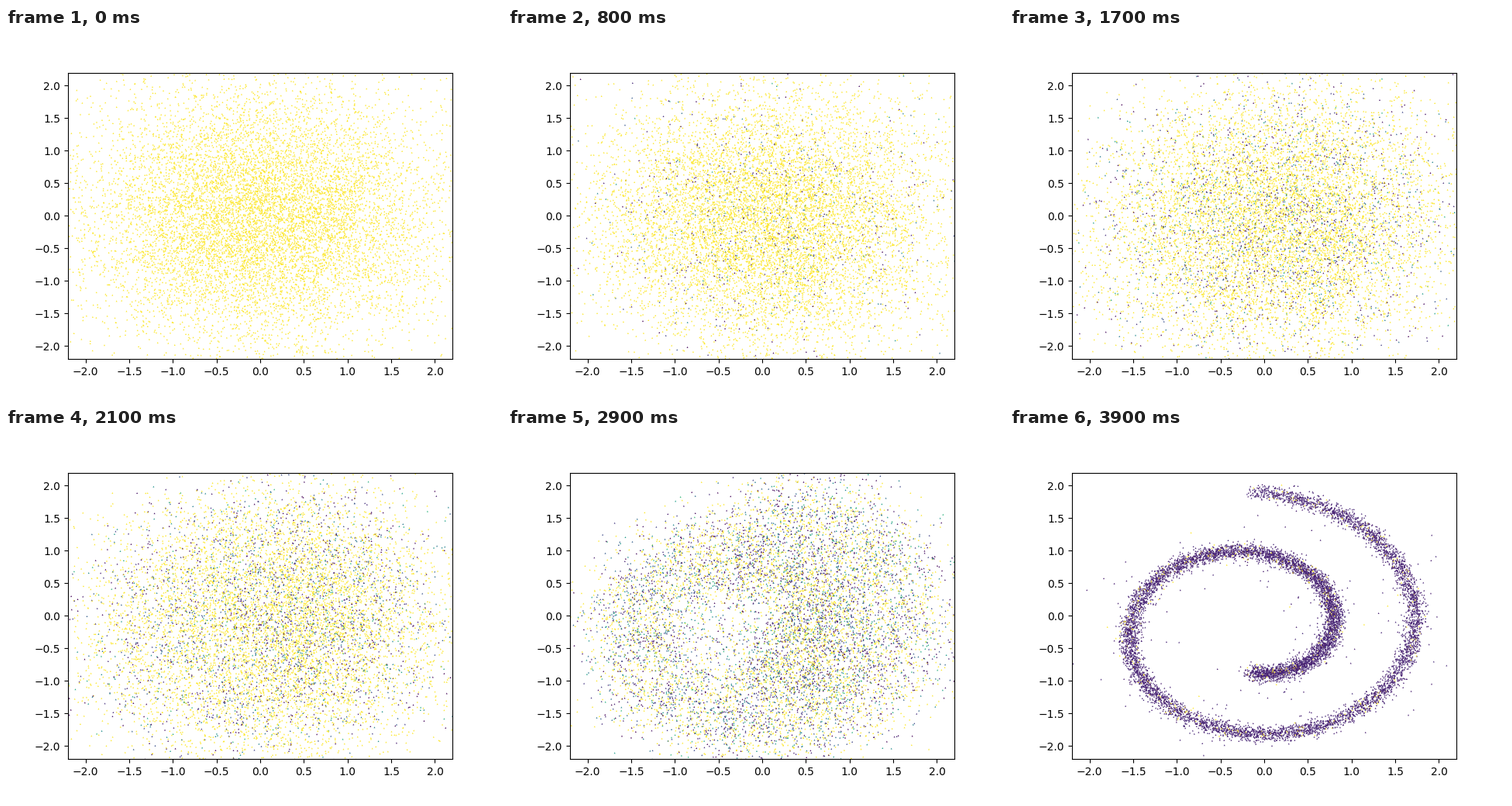
A matplotlib script that plays this animation: 640x480 px, repeating every 4000 ms.

```python
import numpy as np
import matplotlib.pyplot as plt
from matplotlib.animation import FuncAnimation

FRAMES = 40
COUNT = 10000
rng = np.random.default_rng(7)


def swiss_roll(n):
    t = 1.5 * np.pi * (1 + 2 * rng.random(n))
    roll = 0.148 * np.column_stack([t * np.cos(t), t * np.sin(t)])
    # a small share of the points strays from the roll
    spread = np.where(rng.random((n, 1)) < 0.03, 0.24, 0.06)
    return roll + [-0.14, -0.18] + spread * rng.normal(size=(n, 2))


def diffuse(start):
    """Add noise step by step; the last state is almost pure noise."""
    signal = np.cos(0.5 * np.pi * np.arange(FRAMES) / FRAMES)
    states = [start]
    for before, after in zip(signal, signal[1:]):
        keep = after / before
        noise = np.sqrt(1 - keep ** 2) * rng.normal(size=start.shape)
        states.append(keep * states[-1] + noise)
    return states


path = diffuse(swiss_roll(COUNT))[::-1]
switch = rng.random(COUNT)
shade = rng.random(COUNT)


def levels(k):
    """Colour values: yellow points turn dark as the roll appears."""
    dark = np.interp(k, [0, 8, 13, 21, 29, 35, 39],
                     [0, 0.07, 0.11, 0.28, 0.53, 0.82, 0.95])
    low = np.interp(k, [35, 39], [0, 0.08])
    high = np.interp(k, [0, 29, 35, 39], [0.6, 0.7, 0.8, 0.13])
    return np.where(switch < dark, low + (high - low) * shade ** 1.7, 1.0)


fig, ax = plt.subplots(figsize=(6.4, 4.8), dpi=100)
dots = ax.scatter(path[0][:, 0], path[0][:, 1], c=levels(0), s=2, marker="^",
                  linewidths=0, cmap="viridis", vmin=0, vmax=1)
ax.set_xlim(-2.2, 2.2)
ax.set_ylim(-2.2, 2.2)


def update(k):
    dots.set_offsets(path[k])
    dots.set_array(levels(k))
    return (dots,)


anim = FuncAnimation(fig, update, frames=FRAMES, interval=100, repeat=True,
                     repeat_delay=0)
plt.show()
```
